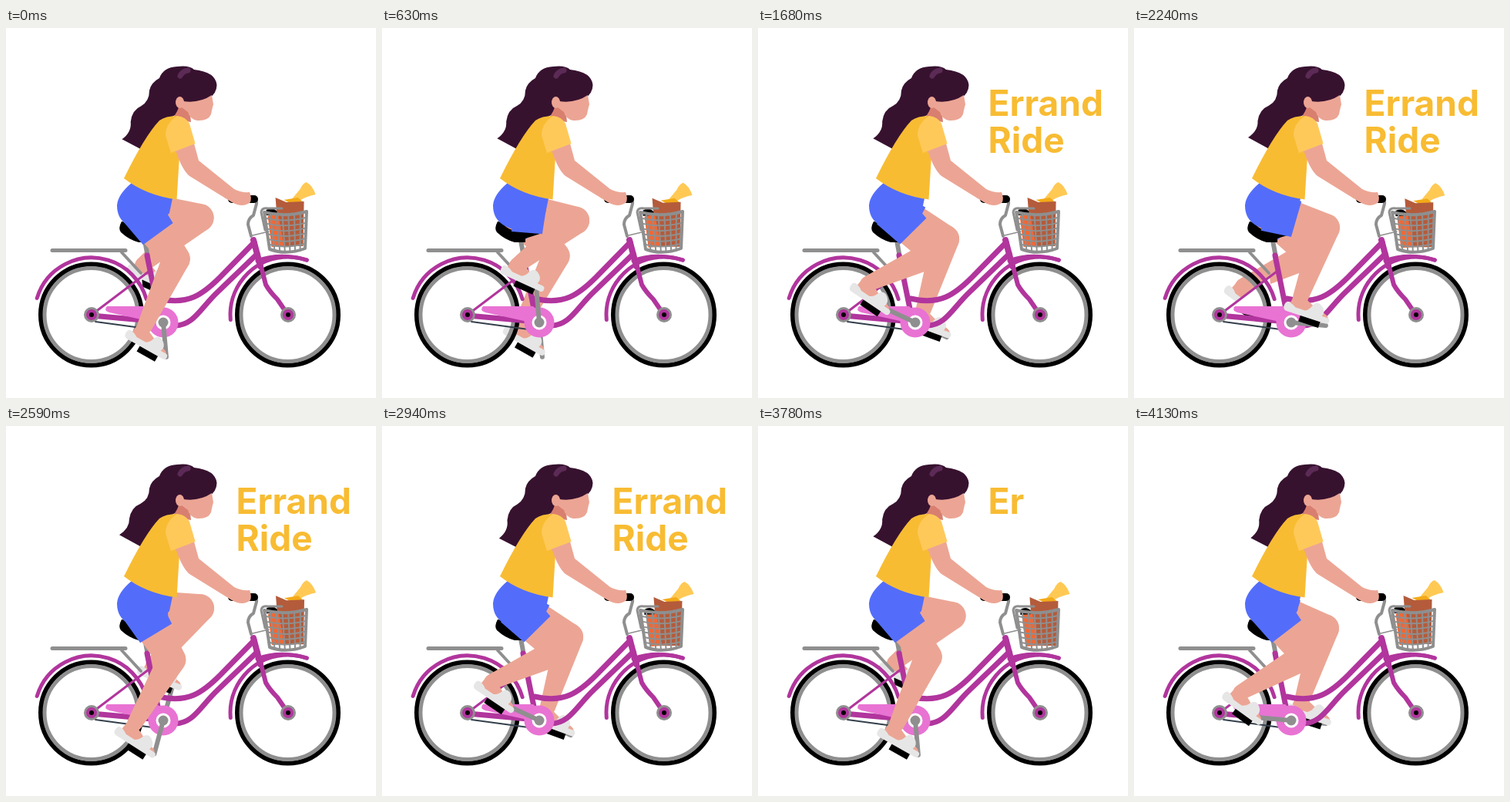
Write an HTML page with a canvas that moves like this. It is 480 px wide and 480 px high and loops after 4200 ms.

```html
<!DOCTYPE html>
<html lang="en">
<head>
<meta charset="utf-8">
<title>Errand Ride</title>
<style>
html, body { margin: 0; width: 100%; height: 100%; overflow: hidden; background: #fff; }
canvas { display: block; width: 100vmin; height: 100vmin; }
</style>
</head>
<body>
<canvas id="stage" width="480" height="480"></canvas>
<script>
const ctx = document.getElementById('stage').getContext('2d');
const LOOP = 4200, STEP = 70, TURN = 1260, SWAY = 1050, BOB = 840;
const TAU = Math.PI * 2, RAD = Math.PI / 180;
const SKIN = '#eca594', NECK = '#d97f70', HAIR = '#37122f', SHIRT = '#f8bc33', SLEEVE = '#ffc95a';
const BLUE = '#536dfa', SHOE = '#e6e6e6', GRAY = '#8f8f8f', PURPLE = '#b1359d', PINK = '#e873d3';
const HIP = { x: 176, y: 238 }, CRANK = { x: 204, y: 382 };
const THIGH = 76, SHANK = 96;
// Foot paths: centre, vertical radius and slant
const NEAR = { x: 183.5, y: 366, ry: 43, slant: -6 };
const FAR = { x: 186, y: 363, ry: 41, slant: 2 };

function fill(d, color) {
  ctx.fillStyle = color;
  ctx.fill(new Path2D(d));
}

function line(d, color, width, cap = 'round') {
  ctx.strokeStyle = color;
  ctx.lineWidth = width;
  ctx.lineCap = cap;
  ctx.lineJoin = 'round';
  ctx.stroke(new Path2D(d));
}

function disc(x, y, r, color) {
  ctx.fillStyle = color;
  ctx.beginPath();
  ctx.arc(x, y, r, 0, TAU);
  ctx.fill();
}

function arc(x, y, r, from, to, color, width) {
  ctx.strokeStyle = color;
  ctx.lineWidth = width;
  ctx.lineCap = 'round';
  ctx.beginPath();
  ctx.arc(x, y, r, from * RAD, to * RAD);
  ctx.stroke();
}

// Limb segment that narrows from radius ra to rb
function taper(a, b, ra, rb, color) {
  const dx = b.x - a.x, dy = b.y - a.y, dir = Math.atan2(dy, dx);
  const open = Math.acos((ra - rb) / Math.hypot(dx, dy));
  ctx.fillStyle = color;
  ctx.beginPath();
  ctx.arc(a.x, a.y, ra, dir + open, dir - open + TAU);
  ctx.arc(b.x, b.y, rb, dir - open, dir + open);
  ctx.fill();
}

function legPose(angle, path) {
  const c = Math.cos(angle), s = Math.sin(angle);
  const foot = { x: path.x + 42 * c, y: path.y + path.ry * s + path.slant * c };
  const tilt = (27 - 9.5 * c + 2.5 * s) * RAD;
  const ct = Math.cos(tilt), st = Math.sin(tilt), lift = 14 + 4 * s;
  const ankle = { x: foot.x - 14 * ct + lift * st, y: foot.y - 14 * st - lift * ct };
  const dx = ankle.x - HIP.x, dy = ankle.y - HIP.y, d = Math.hypot(dx, dy);
  const along = (THIGH ** 2 - SHANK ** 2 + d * d) / (2 * d);
  const out = Math.sqrt(THIGH ** 2 - along ** 2);
  const knee = {
    x: HIP.x + (dx * along + dy * out) / d,
    y: HIP.y + (dy * along - dx * out) / d
  };
  return { foot, tilt, ankle, knee };
}

function drawShoe({ foot, tilt }) {
  ctx.save();
  ctx.translate(foot.x, foot.y);
  ctx.rotate(tilt);
  fill('M-7 7H20V16H-7Z', '#000');
  fill('M-23 -14L-5 -14L8 -8L22 -4Q29 -2 29 3L-25 3Z', SKIN);
  fill('M-27 -4Q-31 -4 -31 2Q-31 8 -26 8H27Q31 8 31 4Q31 0 27 0H-16Q-22 -4 -27 -4Z', SHOE);
  fill('M-9 3Q2 -1 4 -9Q7 -16 13 -14Q21 -10 21 -4L19 4Z', SHOE);
  ctx.restore();
}

function drawLeg(pose, cuff) {
  const { knee, ankle } = pose;
  taper(knee, ankle, 18, 10, SKIN);
  taper(HIP, knee, 25, 18, SKIN);
  drawShoe(pose);
  const ux = (knee.x - HIP.x) / THIGH, uy = (knee.y - HIP.y) / THIGH;
  const at = (u, v) => `${HIP.x + ux * u - uy * v} ${HIP.y + uy * u + ux * v}`;
  fill(`M${at(-4, -27)}L${at(cuff, -24)}L${at(cuff, 24)}L${at(-4, 27)}Z`, BLUE);
}

function drawCrank(angle) {
  const x = CRANK.x + 45 * Math.cos(angle), y = CRANK.y + 45 * Math.sin(angle);
  line(`M${CRANK.x} ${CRANK.y}L${x} ${y}`, GRAY, 6);
}

function drawWheel(x, y) {
  arc(x, y, 65.5, 0, 360, '#000', 6);
  arc(x, y, 60.5, 0, 360, GRAY, 5);
}

function drawHub(x, y) {
  disc(x, y, 10, GRAY);
  disc(x, y, 7, PURPLE);
  disc(x, y, 3, '#000');
}

function drawBikeBack() {
  fill('M111 372L176 323L180 362L130 362Z', '#fff');
  drawWheel(110.5, 372);
  drawWheel(365.5, 372);
  arc(111, 372, 74, 197, 344, PURPLE, 5);
  arc(366, 372, 75, 175, 289, PURPLE, 5);
  line('M60 288.5H155', GRAY, 5);
  line('M150 291L175 318', GRAY, 4);
  line('M180 276L184 297', GRAY, 6, 'butt');
  line('M183 295L197 364', PURPLE, 7);
  line('M111 372L185 316', PURPLE, 3);
  line('M111 373L200 381', PURPLE, 7);
  line('M116 381L190 391', '#34404c', 2);
  line('M198 351C236 360 255 346 278 323L322 278', PURPLE, 7);
  line('M219 386C243 386 252 364 274 343L326 293', PURPLE, 7);
  line('M321 275L330 309', PURPLE, 8);
  line('M330 306L337 333Q342 342 352 352L365 371', PURPLE, 6);
  line('M326 302Q355 291 390 301', PURPLE, 5);
  drawHub(111, 372);
  drawHub(366, 372);
  fill('M131 361H196L211 374L196 391L184 380L134 369Q126 366 131 361Z', PINK);
  disc(CRANK.x, CRANK.y, 11, '#fff');
  arc(CRANK.x, CRANK.y, 14.5, 0, 360, PINK, 10);
  disc(CRANK.x, CRANK.y, 6.5, GRAY);
  fill('M150 251Q145 260 149 265Q160 275 172 278H186V273L205 267L190 256Z', '#000');
}

function drawHead(sway) {
  const p = (x, y, w) => `${x + sway * w} ${y + sway * w * 0.9}`;
  fill(`M222 50Q238 48 244 54Q272 57 273.500 74Q273 97 232 97L222 112Q205 118 191 139Q184 149 ${p(177, 158, 0.6)}
    L${p(149, 143, 1)}Q${p(162, 134, 0.8)} ${p(161, 121, 0.5)}Q${p(163, 106, 0.3)} ${p(175, 101, 0.2)}
    Q186 95 186 81Q188 71 199 65Q204 51 222 50Z`, HAIR);
  fill('M226 98L238 104L240 122L216 118L222 108Z', NECK);
  fill('M230 95Q251 98 267 87L269 99Q267 106 266 112Q262 121 248 120Q238 118 236 109L228 103Z', SKIN);
  ctx.fillStyle = SKIN;
  ctx.beginPath();
  ctx.ellipse(225.5, 96.5, 5.5, 7.5, 0, 0, TAU);
  ctx.fill();
  line('M226 62Q229 56 236 55', '#5b2b56', 7);
}

function drawTorso() {
  fill('M163 201Q145 216 144 230Q144 249 160 257Q170 263 190 263L212 240L216 221Z', BLUE);
  fill('M222 114Q207 114 199 120Q180 140 153 195Q181 217 221.500 222.500L225 166L238 128Z', SHIRT);
}

function drawArm() {
  line('M318 270L314 255Q314 247 321 243L325 228Q326 220 317 220', GRAY, 4);
  line('M320 269L341 264', GRAY, 1.5);
  line('M293 222L322 222', '#000', 10);
  fill('M220 159L244 150L250 172L296 209Q305 214 316 213Q319 220 317 226Q307 234 293 226L238 192Q229 185 220 159Z', SKIN);
  fill('M222 114Q233 115 238 124L245.500 150L214 162L207 139Q207 124 222 114Z', SLEEVE);
}

function drawBasket(bob) {
  ctx.save();
  ctx.translate(bob, bob * 0.7);
  fill('M373 222L383 210Q386 203 391 201Q399 205 403 217Q390 220 384 224Z', '#ffc954');
  fill('M362 224L380 221L386 226L374 230Z', '#f3aa18');
  fill('M351 221L365 227L388 226L387 284L356 284Z', '#b45b3b');
  fill('M341 245L354 239L362 284L346 285Z', '#ef6837');
  fill('M339 237Q347 232 353 239L353 243L339 244Z', '#000');
  ctx.restore();
  line('M336 262L331 239Q332 233 339 234H358', GRAY, 3);
  line('M335 239Q362 246 390 238L388 286Q364 295 342 287Z', GRAY, 4);
  for (let i = 1; i < 7; i++) {
    const top = 335 + i * 7.8, low = 342 + i * 6.6;
    line(`M${top} 241L${low} 289`, GRAY, 2);
  }
  for (let i = 1; i < 7; i++) {
    const y = 240 + i * 6.8;
    line(`M${335 + i} ${y}Q363 ${y + 6} ${390 - i * 0.3} ${y - 1}`, GRAY, 2);
  }
}

function drawWord(word, x, y, edge) {
  if (edge <= 295) return;
  ctx.save();
  ctx.beginPath();
  ctx.rect(295, y - 45, edge - 295, 60);
  ctx.clip();
  ctx.fillText(word, x, y);
  ctx.restore();
}

function drawTitle(t) {
  if (t < 840 || t > 3850) return;
  const left = 1 - Math.min(1, (t - 770) / 730);
  const x = 298.5 + 66 * left ** 3;
  const speed = 160 / 280;
  const hide = Math.max(0, t - 3600) * 1.3;
  ctx.font = '700 46px Inter, "Open Sans", sans-serif';
  ctx.fillStyle = SHIRT;
  drawWord('Errand', x, 113.5, Math.min(470, 300 + (t - 840) * speed) - Math.max(0, hide - 110));
  drawWord('Ride', x, 162, Math.min(410, 300 + (t - 1166) * speed) - hide);
}

function draw(t) {
  const near = (90 + 360 * t / TURN) * RAD, far = near + Math.PI;
  const sway = 3 * Math.cos(TAU * (t / SWAY - 0.83));
  const bob = -1.5 * Math.cos(TAU * (t / BOB - 0.95));
  ctx.fillStyle = '#fff';
  ctx.fillRect(0, 0, 480, 480);
  drawCrank(far - 5 * RAD);
  drawLeg(legPose(far, FAR), 34);
  drawBikeBack();
  drawCrank(near - 5 * RAD);
  drawLeg(legPose(near, NEAR), 36);
  drawHead(sway);
  drawTorso();
  drawBasket(bob);
  drawArm();
  drawTitle(t);
}

const start = performance.now();
function tick(now) {
  const t = Math.max(0, now - start) % LOOP;
  draw(Math.floor(t / STEP) * STEP);
  requestAnimationFrame(tick);
}
draw(0);
requestAnimationFrame(tick);
</script>
</body>
</html>
```
